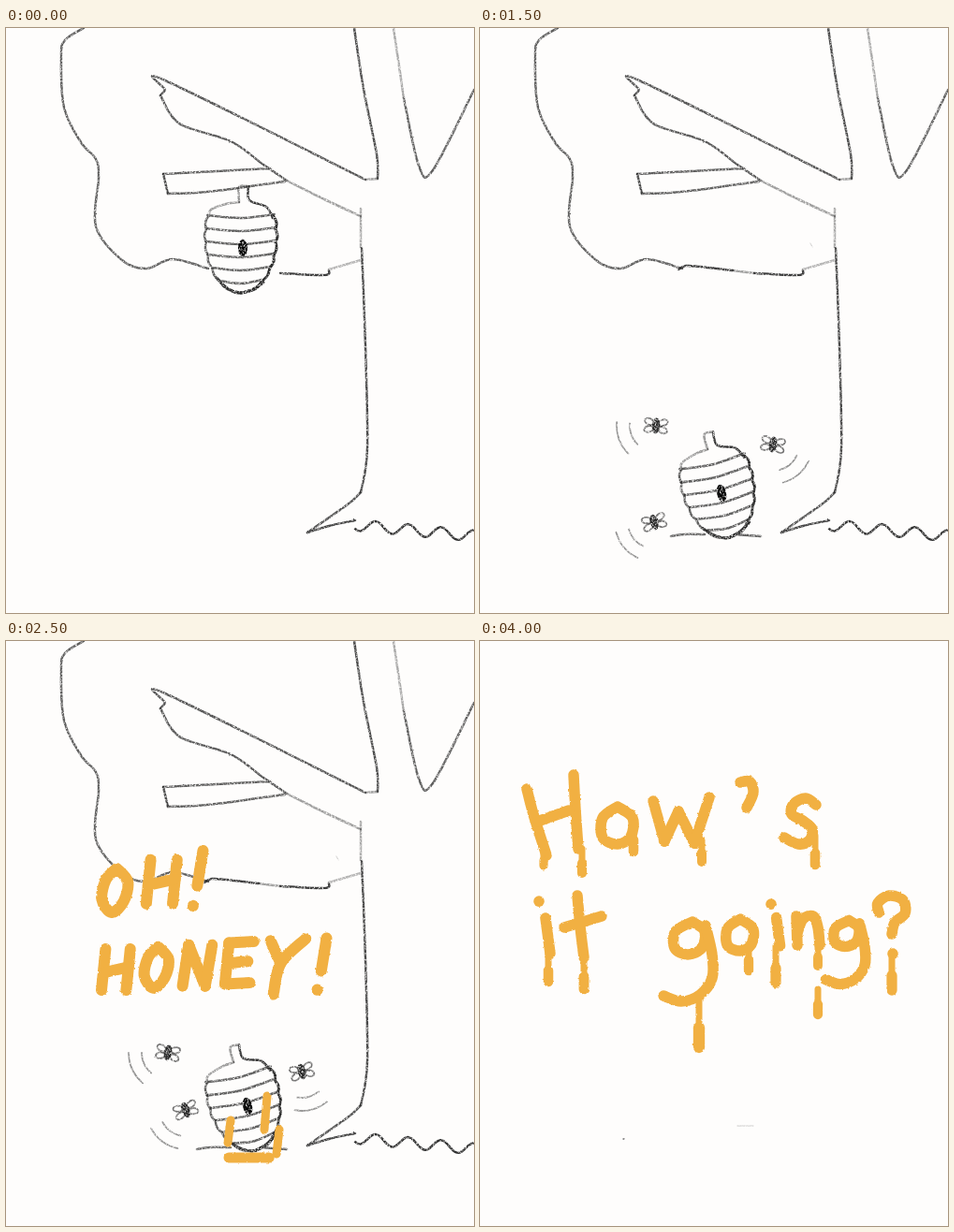
Recreate the animation shown at these times as an HTML page. Size 500x625 px, loop 4.5 s.

```html
<!DOCTYPE html>
<html lang="en">
<head>
<meta charset="utf-8">
<title>Oh honey</title>
<style>
  html, body { margin: 0; width: 100%; height: 100%; overflow: hidden; background: #fefdfc; }
  svg { display: block; width: 100vw; height: 100vh; }
  path, ellipse { fill: none; stroke-linecap: round; stroke-linejoin: round; }
</style>
</head>
<body>
<svg id="stage" viewBox="0 0 500 625" role="img" aria-label="Oh! Honey! How's it going?">
  <defs>
    <filter id="pencil" filterUnits="userSpaceOnUse" x="0" y="0" width="500" height="625" color-interpolation-filters="sRGB">
      <feTurbulence type="fractalNoise" baseFrequency=".55" numOctaves="2" seed="4" result="noise"/>
      <feDisplacementMap in="SourceGraphic" in2="noise" scale="1.5" xChannelSelector="R" yChannelSelector="G" result="rough"/>
      <feColorMatrix in="noise" values="0 0 0 0 0  0 0 0 0 0  0 0 0 0 0  0 0 0 2.6 -.45" result="grain"/>
      <feComposite in="rough" in2="grain" operator="in"/>
    </filter>
    <filter id="crayon" filterUnits="userSpaceOnUse" x="0" y="0" width="500" height="625" color-interpolation-filters="sRGB">
      <feTurbulence type="fractalNoise" baseFrequency=".3" numOctaves="2" seed="9" result="noise"/>
      <feDisplacementMap in="SourceGraphic" in2="noise" scale="2.5" xChannelSelector="R" yChannelSelector="G"/>
    </filter>
  </defs>
</svg>
<script>
const STEP = 500, STEPS = 9;
const INK = '#282828', HONEY = '#f1b042';
const stage = document.getElementById('stage');
const layers = [];
const range = n => [...Array(n).keys()];
const parse = text => text.split(' ').map(pair => pair.split(',').map(Number));

function add(parent, tag, attrs) {
  const el = document.createElementNS('http://www.w3.org/2000/svg', tag);
  for (const key in attrs) el.setAttribute(key, attrs[key]);
  return parent.appendChild(el);
}

// A filtered group, visible from step `from` up to, not including, `to`.
function layer(from, to, filter) {
  const el = add(stage, 'g', { filter: `url(#${filter})` });
  layers.push({ el, from, to });
  return el;
}

// Smooth path through a list of [x, y] points.
function curve(p) {
  let d = `M${p[0]}`;
  for (let i = 0; i < p.length - 1; i++) {
    const a = p[i - 1] || p[i], b = p[i], c = p[i + 1], e = p[i + 2] || c;
    d += `C${[0, 1].map(k => b[k] + (c[k] - a[k]) / 6)} ${[0, 1].map(k => c[k] - (e[k] - b[k]) / 6)} ${c}`;
  }
  return d;
}

const stroke = (g, points, color, width, opacity = 1) =>
  add(g, 'path', { d: curve(points), stroke: color, 'stroke-width': width, 'stroke-opacity': opacity });
const pencil = (g, points, tone = .85, width = 2.5) => stroke(g, points, INK, width, tone);
const sketch = (g, text, tone, width) => pencil(g, parse(text), tone, width);
const brush = (g, points, width = 11.5) => stroke(g, points, HONEY, width);

function drawTree(g) {
  sketch(g, '83,0 63,13 59,30 62,85 80,122 96,140 99,160 96,212 124,248 150,257 178,247 216,257', .75);
  sketch(g, '293,262 340,264 345,259', .9);
  sketch(g, '345,258 379,248', .35);
  sketch(g, '384,162 172,57 170,66 165,72', .8);
  sketch(g, '165,72 185,102 240,121 275,146 300,163', .8);
  sketch(g, '300,163 340,183 379,201', .45);
  sketch(g, '372,0 382,65 396,135 397,161', .85);
  sketch(g, '384,162 397,161', .45);
  sketch(g, '414,0 425,75', .4);
  sketch(g, '425,75 441,147 456,152 500,66', .75);
  sketch(g, '283,150 168,156', .75);
  sketch(g, '168,156 173,177', .85);
  sketch(g, '173,177 215,175 298,164', .75);
  sketch(g, '379,193 379,235', .4);
  sketch(g, '380,235 384,340 386,450 379,496', .85);
  sketch(g, '379,496 365,509 322,539', .8);
  sketch(g, '322,539 345,532 373,526', .85);
  pencil(g, range(44).map(i => {
    const x = 373 + i * 3;
    return [x, 531 + .09 * (x - 373) - 6 * Math.cos((x - 360) / 35 * 2 * Math.PI)];
  }), .95);
}

// A barrel of six bands; the outline bulges between them.
function drawHive(parent, dx, dy, turn) {
  const g = add(parent, 'g', { transform: `translate(${dx} ${dy}) rotate(${turn} 253 235)` });
  const bandTop = 201, gap = 14, middle = 251;
  const half = y => 38 * Math.sqrt(Math.max(0, 1 - ((y - 222) / 61) ** 2));
  const side = dir => range(25).map(i => {
    const y = bandTop + i * 82 / 24;
    return [middle + dir * (half(y) + 2 * Math.abs(Math.sin((y - bandTop) / gap * Math.PI)) - 1), y];
  });
  pencil(g, side(-1), .75);
  pencil(g, side(1), 1, 3);
  sketch(g, '225,267 235,277 248,283 262,280 275,272', 1, 3);
  for (const i of range(6)) {
    const y = bandTop + i * gap, w = half(y);
    pencil(g, [[middle - w, y - 1], [middle, y + 2], [middle + w, y - 2]], .75, 2.6);
  }
  sketch(g, '217,201 219,194 235,188 249,186', .45);
  sketch(g, '249,186 249,170 258,169', .5);
  sketch(g, '259,169 260,184 278,191 285,203', .95);
  add(g, 'ellipse', { cx: 253, cy: 235, rx: 4.5, ry: 9, style: 'fill:#000', stroke: '#000' });
}

// Two motion arcs lie around the bee, on the side given by `trail` in degrees.
function drawBee(parent, x, y, turn, trail) {
  const g = add(parent, 'g', { transform: `translate(${x} ${y}) rotate(${turn})` });
  for (const sx of [-1, 1]) for (const sy of [-1, 1])
    add(g, 'ellipse', {
      cx: 7.5 * sx, cy: 4 * sy, rx: 5, ry: 3.2, stroke: INK, 'stroke-opacity': .65, 'stroke-width': 1.9,
      transform: `rotate(${20 * sx * sy} ${7.5 * sx} ${4 * sy})`
    });
  add(g, 'ellipse', { rx: 3.6, ry: 8, style: `fill:${INK}`, stroke: INK });
  for (const radius of [28, 42])
    pencil(parent, range(5).map(i => {
      const angle = trail * Math.PI / 180 + (i - 2) * .22;
      return [x + radius * Math.cos(angle), y + radius * Math.sin(angle)];
    }), .5, 1.8);
}

// Honey running out of the hive, longer with each stage.
function drawLeak(g, stageNo) {
  for (const [x, y, length] of [[240, 512, 12], [279, 486, 18], [292, 522, 13]])
    brush(g, [[x, y], [x - 1.5 * stageNo, y + length * stageNo]], 9);
  const reach = 12 * stageNo, y = 546 + 3 * stageNo;
  brush(g, [[262 - reach, y], [262 + reach * .8, y]], 4 + 3.5 * stageNo);
}

// Block capitals in a unit box: width, then strokes.
const capitals = {
  H: [.6, '0,0 0,1|.6,0 .6,1|0,.58 .6,.44'],
  O: [.55, '.27,0 .55,.3 .5,.75 .25,1 0,.7 .05,.25 .27,0'],
  N: [.62, '0,1 .05,0|.05,0 .55,1|.55,1 .62,0'],
  E: [.6, '0,0 0,1|0,0 .6,-.03|0,.5 .5,.45|0,1 .6,.97'],
  Y: [.85, '0,0 .3,.55|.85,-.05 .3,.55 .2,1.3'],
  '!': [.2, '.1,0 .05,.8|0,1.25 0,1.26']
};

function shout(g, text, x, y, size, slope, gap) {
  const lean = .1;
  let pen = 0;
  for (const char of text) {
    const [width, strokes] = capitals[char];
    for (const part of strokes.split('|'))
      brush(g, parse(part).map(([u, v]) =>
        [x + pen + size * (u + lean * (1 - v)), y + slope * pen + size * v]), 12);
    pen += width * size + gap;
  }
}

// Handwriting in pixels around each letter's anchor.
const script = {
  H: '0,15 7,42 21,86|50,0 52,37 55,79|11,50 45,38',
  o: '0,-20 16,-8 14,12 0,20 -16,13 -16,-8 0,-20',
  w: '0,0 12,43|12,43 27,11|27,11 44,45|44,45 60,-4',
  "'": '0,0 10,-1 14,11 7,27',
  s: '0,0 -11,-7 -24,-1 -26,10 -14,17 -4,26 -7,38 -19,42 -34,35',
  i: '0,0 0,.2|7,18 12,56',
  t: '0,0 3,33 7,66|-14,34 26,22',
  g: '4,-18 17,-8 14,10 -1,17 -15,10 -14,-8 4,-18|18,-14 25,17 25,42 12,60 -8,67 -27,61',
  n: '0,0 1,31|1,18 7,3 18,0 23,12 25,31',
  '?': '0,0 -1,-10 11,-18 26,-13 28,1 17,11 14,23|15,44 15,44.2'
};

function write(g, char, x, y, scale = 1) {
  for (const part of script[char].split('|'))
    brush(g, parse(part).map(([u, v]) => [x + u * scale, y + v * scale]));
}

function drawQuestion(g) {
  write(g, 'H', 50, 143);
  write(g, 'o', 147, 197);
  write(g, 'w', 185, 171);
  write(g, "'", 278, 151);
  write(g, 's', 359, 175);
  write(g, 'i', 63, 278);
  write(g, 't', 104, 272);
  write(g, 'g', 223, 318);
  write(g, 'o', 278, 314, .85);
  write(g, 'i', 311, 281, .8);
  write(g, 'n', 338, 294);
  write(g, 'g', 391, 313, .8);
  write(g, '?', 426, 290);
}

// Thin threads with a heavier drop at the lower end: x, top, length.
const drips = '68,226,14 109,222,26 164,194,31 237,212,24 358,208,31 73,334,30 111,338,34 234,382,52 287,324,28 316,326,39 361,324,23 361,372,27 440,334,39'
  .split(' ').map(drip => drip.split(',').map(Number));

function drawDrips(g, amount) {
  for (const [x, top, length] of drips) {
    const end = top + length * amount;
    brush(g, [[x, top], [x, end]], 7);
    brush(g, [[x, end - length * amount * .4], [x, end]], 8 + length / 12);
  }
}

drawTree(layer(0, 6, 'pencil'));
drawHive(layer(0, 1, 'pencil'), 0, 0, 0);
drawHive(layer(1, 2, 'pencil'), 1, 95, -4);

const leaves = layer(1, 6, 'pencil');
sketch(leaves, '212,258 220,254 235,255 270,259', .9);
sketch(leaves, '270,259 293,262', .45);
sketch(leaves, '353,230 355,234', .25, 1);

const landed = layer(2, 6, 'pencil');
drawHive(landed, 5, 262, -13);
sketch(landed, '204,543 218,541 240,541', .7);
sketch(landed, '272,541 300,543', .75);

const swarms = [
  [[188, 425, 5, 160], [313, 445, 10, 50], [186, 528, -15, 140]],
  [[194, 438, 15, 180], [281, 422, 25, 55], [168, 517, -5, 150]],
  [[173, 440, 10, 155], [316, 460, -15, 75], [192, 501, -20, 127]]
];
swarms.forEach((swarm, i) => {
  const g = layer(3 + i, 4 + i, 'pencil');
  for (const bee of swarm) drawBee(g, ...bee);
});

drawLeak(layer(4, 5, 'crayon'), 1);
drawLeak(layer(5, 6, 'crayon'), 2);

const cry = layer(5, 6, 'crayon');
shout(cry, 'OH!', 101, 243, 47, -.19, 23);
shout(cry, 'HONEY!', 102, 329, 44, -.05, 18);

drawQuestion(layer(6, 9, 'crayon'));
drawDrips(layer(7, 8, 'crayon'), .55);
drawDrips(layer(8, 9, 'crayon'), 1);
const specks = layer(6, 9, 'pencil');
sketch(specks, '153,532 154,532', .7, 1.4);
sketch(specks, '275,518 292,518', .25, 1);

function render() {
  const step = Math.floor(performance.now() / STEP) % STEPS;
  for (const { el, from, to } of layers)
    el.style.display = step >= from && step < to ? '' : 'none';
  requestAnimationFrame(render);
}
render();
</script>
</body>
</html>
```
